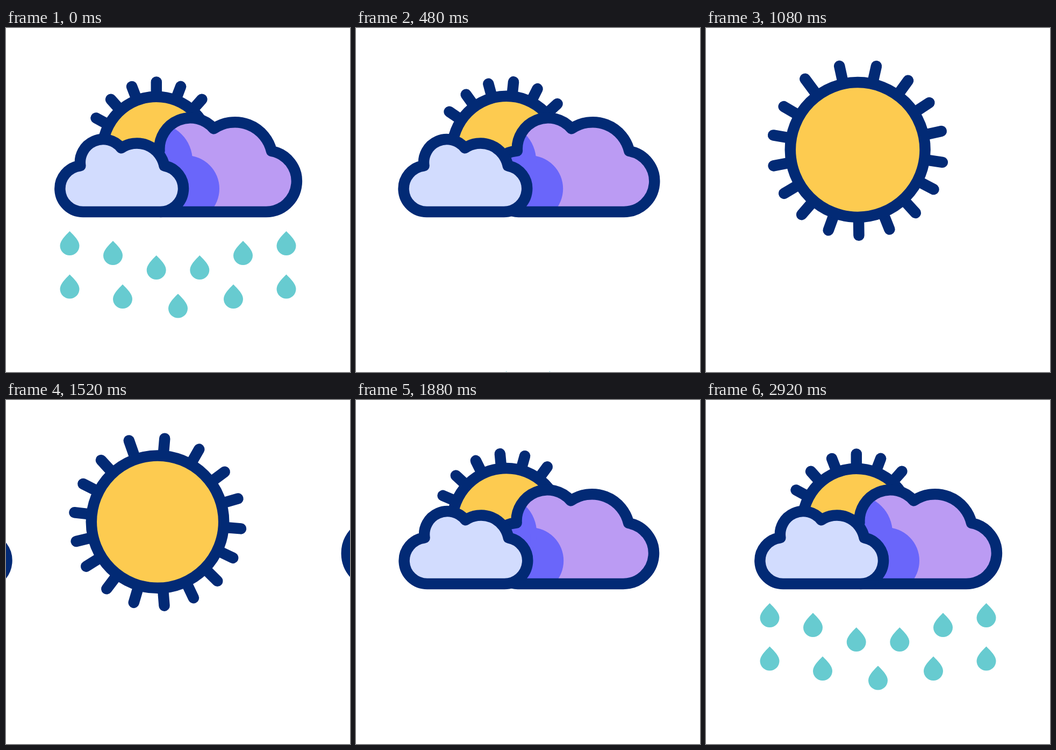
Write an HTML page that moves like this. It is 640 px wide and 640 px high and loops after 3 s.

```html
<!DOCTYPE html>
<html lang="en">
<head>
<meta charset="utf-8">
<title>Weather</title>
<style>
  html, body { margin: 0; width: 100%; height: 100%; overflow: hidden; background: #fff; }
  svg { display: block; width: 100%; height: 100%; }
  .line { stroke: #022a75; stroke-width: 20.5; stroke-linejoin: round; stroke-linecap: round; }
</style>
</head>
<body>
<svg viewBox="0 0 640 640">
  <defs>
    <path id="bigCloud" d="M288 342A56.85 56.85 0 0 1 285.5 228.5A57.5 57.5 0 0 1 386.5 187.3A70 70 0 0 1 494 229A56.95 56.95 0 0 1 483.5 342Z"/>
    <clipPath id="bigClip"><use href="#bigCloud"/></clipPath>
    <path id="drop" fill="#67cbd0" d="M0-27C9-18 18-9 18 0A18 18 0 0 1-18 0C-18-9-9-18 0-27Z"/>
  </defs>
  <g id="drops"></g>
  <g id="sun">
    <g id="rays"></g>
    <circle id="disc" class="line" fill="#fdcb50"/>
  </g>
  <g id="right">
    <use href="#bigCloud" fill="#bb9bf3"/>
    <g clip-path="url(#bigClip)">
      <g id="shadow" fill="#6a66fa">
        <circle cx="335" cy="299" r="62"/>
        <circle cx="277" cy="247" r="70"/>
        <path d="M220 250H335V361H220Z"/>
      </g>
    </g>
    <use href="#bigCloud" class="line" fill="none"/>
  </g>
  <path id="left" class="line" fill="#d2dcfe" d="M143.3 342A43 43 0 0 1 138.3 256.3A43 43 0 0 1 214.5 223.3A52 52 0 0 1 294.5 256.3A43.2 43.2 0 0 1 286 342Z"/>
</svg>
<script>
const LOOP = 3000, FALL = 480, OFFSTAGE = 668;
const OPEN_AT = 373, CLOSED_AT = 1985, OPENING = 796;
const $ = id => document.getElementById(id);
const clamp = x => Math.min(1, Math.max(0, x));
const smooth = x => (x = clamp(x), x * x * (3 - 2 * x));
const move = (el, x, y = 0) => el.setAttribute('transform', `translate(${x} ${y})`);

// cubic-bezier(.52, 0, 0, 1)
function swift(x) {
  x = clamp(x);
  let lo = 0, hi = 1;
  for (let i = 0; i < 24; i++) {
    const s = (lo + hi) / 2;
    if (1.56 * (1 - s) ** 2 * s + s ** 3 < x) lo = s; else hi = s;
  }
  return smooth(lo);
}

function add(parent, tag, attrs) {
  const el = document.createElementNS('http://www.w3.org/2000/svg', tag);
  for (const key in attrs) el.setAttribute(key, attrs[key]);
  return parent.appendChild(el);
}

// The first six rays always show; the others grow when the sun opens.
const rays = [-61.7, -41.7, -21, 0, 20.8, 41.6, 60.1, 80, 100.6, 121.1,
              144.2, 168.5, 193.4, 216.9, 237.5, 258.3, 279.2]
  .map((angle, i) => ({
    el: add($('rays'), 'line', { class: 'line', transform: `rotate(${angle})` }),
    reach: angle === 144.2 ? 1.31 : 1.271,
    grows: i > 5
  }));

// x, y, hidden x and y, delay when leaving, time of arriving
const drops = [];
function dropPair(x, y, x0, y0, leave, arrive) {
  for (const side of x === 320 ? [0] : [-1, 1]) {
    const mirror = v => 320 + side * (320 - v);
    drops.push({ x: mirror(x), y, x0: mirror(x0), y0, leave, arrive,
                 el: add($('drops'), 'use', { href: '#drop' }) });
  }
}
dropPair(118.5, 485.5, 139, 330.5, 0, 2204);
dropPair(217, 504, 217, 315, 0, 2204);
dropPair(320, 521.5, 320, 306.5, 0, 2204);
dropPair(118.5, 405, 139, 310, 20, 2324);
dropPair(199, 423, 199, 310, 40, 2324);
dropPair(279.7, 450, 279.7, 306, 80, 2324);

function drawDrop(d, t) {
  if (t < 1200) {
    move(d.el, d.x, d.y + (OFFSTAGE - d.y) * swift((t - d.leave) / FALL));
  } else {
    const p = swift((t - d.arrive) / FALL);
    move(d.el, d.x0 + (d.x - d.x0) * p, d.y0 + (d.y - d.y0) * p);
  }
  d.el.setAttribute('visibility', t > 570 && t < 2200 ? 'hidden' : 'visible');
}

function drawSun(t, open) {
  const middle = (OPEN_AT + CLOSED_AT) / 2;
  const radius = 100.3 + 25.2 * open;
  const growth = smooth((middle - 539 - Math.abs(t - middle)) / 220 + 1 - 1 + 0);
  const turn = t < middle ? 180 * open : 360 - 180 * open;
  const rayGrowth = smooth((539 - Math.abs(t - middle)) / 220);
  move($('sun'), 279.8 + 2.4 * open, 228 - 1.5 * open);
  $('disc').setAttribute('r', radius);
  $('rays').setAttribute('transform', `rotate(${turn})`);
  for (const ray of rays) {
    const extra = radius * (ray.reach - 1) * (ray.grows ? rayGrowth : 1);
    ray.el.setAttribute('y1', -radius);
    ray.el.setAttribute('y2', -radius - extra);
  }
}

function draw(now) {
  const t = now % LOOP;
  const open = swift(Math.min(t - OPEN_AT, CLOSED_AT - t) / OPENING);
  const leftX = -361.5 * open, rightX = 441 * open;
  move($('left'), leftX);
  move($('right'), rightX);
  move($('shadow'), leftX - rightX);
  drawSun(t, open);
  for (const d of drops) drawDrop(d, t);
}

const start = performance.now();
function tick() {
  draw(performance.now() - start);
  requestAnimationFrame(tick);
}
tick();
</script>
</body>
</html>
```
